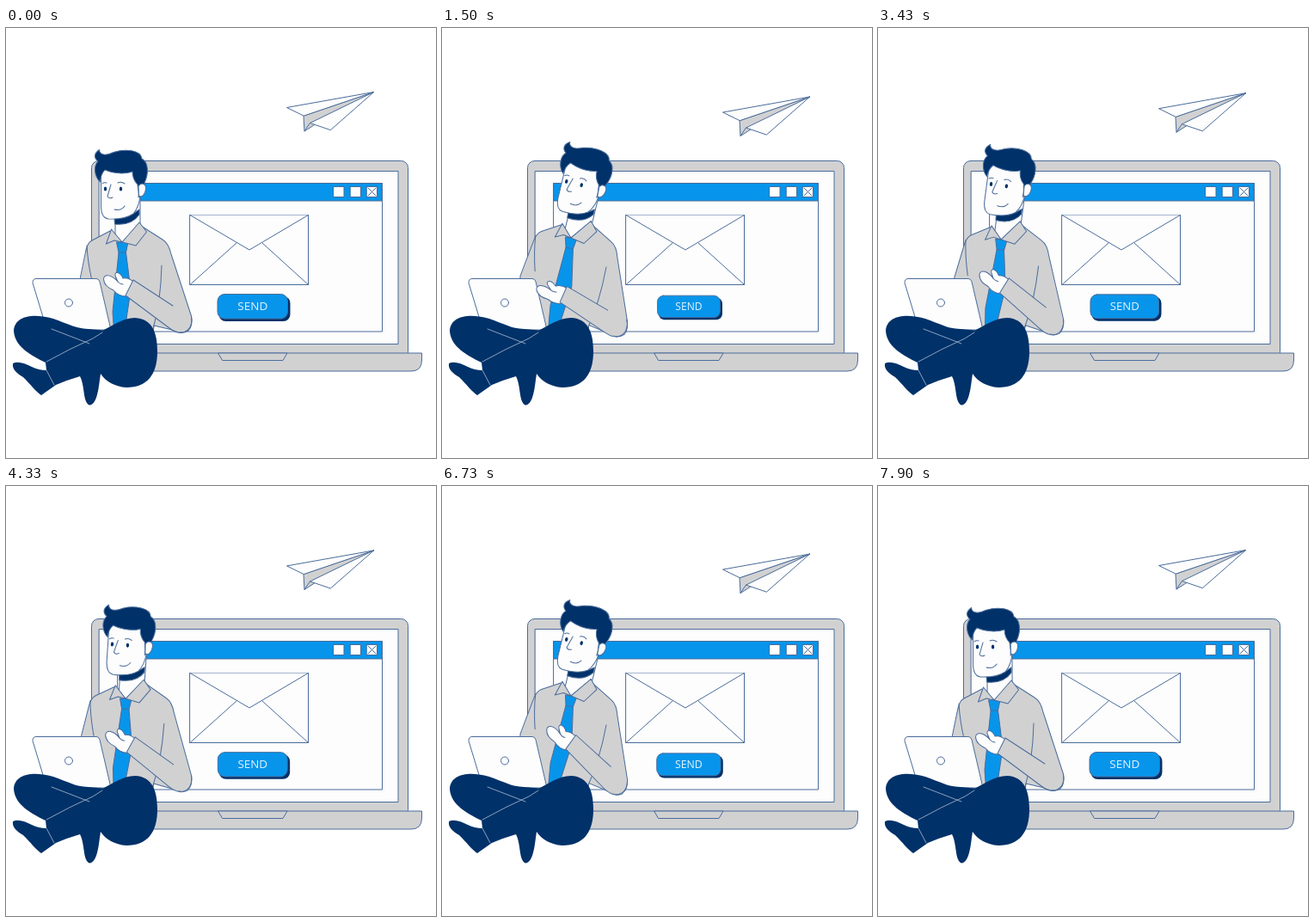
Animation of 500x500 px, one loop 8010 ms. Source, as an HTML page:

```html
<!DOCTYPE html>
<html lang="en">
<head>
<meta charset="utf-8">
<title>Send mail</title>
<style>
html, body { margin: 0; width: 100%; height: 100%; overflow: hidden; background: #fff; }
svg { display: block; width: 100vw; height: 100vh; }
.line { stroke: #4a6c9b; stroke-width: 1; stroke-linejoin: round; stroke-linecap: round; fill: none; }
.grey { fill: #d1d1d2; }
.white { fill: #fdfdfd; }
.blue { fill: #0795eb; }
.navy { fill: #003169; }
text { font: 13.5px "Open Sans", Arial, sans-serif; fill: #e6f4fd; text-anchor: middle; }
</style>
</head>
<body>
<svg viewBox="0 0 500 500">
  <!-- big laptop -->
  <rect class="line grey" x="99.5" y="154.5" width="368" height="230" rx="8"/>
  <rect class="line white" x="108.5" y="166.5" width="347.5" height="201"/>
  <path class="line grey" d="M110 378H483.500V386Q483.500 399 471 399H110Z"/>
  <path class="line grey" d="M247 378H327L322 386.500H252Z"/>
  <rect class="line white" x="130" y="180.500" width="307.500" height="172.500"/>
  <rect class="line blue" x="130" y="180.500" width="307.500" height="20.500"/>
  <g class="line white">
    <rect x="381" y="184.500" width="12" height="12"/>
    <rect x="400.500" y="184.500" width="12" height="12"/>
    <rect x="419.500" y="184.500" width="12" height="12"/>
    <path d="M421 186L430 195M430 186L421 195"/>
  </g>

  <g class="line white">
    <rect x="214" y="217.500" width="137.500" height="81"/>
    <path d="M214 298.500L268 250M351.500 298.500L298 250"/>
    <path d="M214 217.500L283 258L351.500 217.500"/>
  </g>

  <g id="button">
    <rect class="navy" x="247.500" y="312" width="83" height="29" rx="8"/>
    <rect class="line blue" x="246" y="309.500" width="81.500" height="28.500" rx="8"/>
    <text x="286.800" y="328.500">SEND</text>
  </g>

  <g id="plane" class="line white">
    <path class="grey" d="M427.500 74.500L346 102L347 120L358 113Z"/>
    <path d="M427.500 74.500L326.500 92.500L346 102Z"/>
    <path d="M427.500 74.500L353.500 110.500L377 118.500Z"/>
    <path d="M347 120L353.500 110.500"/>
  </g>

  <g id="body">
    <g id="head" class="line white">
      <path d="M127 216V250H156V190Z"/>
      <path class="navy" d="M126 221Q143 221 155 211V217Q146 230 126.500 228Z"/>
      <path d="M110.500 170L110.500 208Q111 221 119 222Q138 223 148 216Q155 208 156 194L156 164H112Z"/>
      <path class="navy" d="M109.500 179C103 173 101 161 107 155C102 151 102 146 108.500 141.500C109 149 118 148 125 144.500C139 140 157 142 158 152C166 156 166 170 161 180L160 186L154 197C155 190 153 185 153 182C149 178 147 173 147 167C135 171 122 168 115 165Q110 170 109.500 179Z"/>
      <path d="M154 184C157 179 163 181 162.500 187C162 193 158 198 154.500 195Z"/>
      <g class="navy" stroke="none">
        <ellipse cx="115.500" cy="187" rx="1.700" ry="2.500"/>
        <ellipse cx="133.500" cy="187" rx="1.700" ry="2.500"/>
      </g>
      <path fill="none" d="M112 181Q114 179 117 180M130 180Q134 178 138 181M122 182L118 196Q120 199 124 197M126 211Q134 213 138 207"/>
    </g>

    <path class="line grey" d="M121 236L100 247Q94 250 92 263L84 302L90 366H170L172 346L206 354Q218 350 215.500 335L192 263Q189 250 182 246L157 230L135 249Z"/>
    <path class="line" d="M94 253Q95 272 100 294M181 276Q180 318 171 350"/>
    <path class="line blue" d="M128.500 249H142L139.500 261L145 305L137 358H126L124 330L131 261Z"/>
    <path class="line" d="M131 261H139.500"/>
    <path class="line grey" d="M122.500 234L116.500 251L126 247L135 249ZM155 226L163.500 237L151 253L135 249Z"/>
  </g>

  <path class="line white" d="M31 296Q31 291.500 35 291.500H105Q108 291.500 109 295L122 351H48Z"/>
  <circle class="line" cx="73" cy="319.500" r="4.500"/>

  <g id="arm">
    <g id="hand" class="line white">
      <path d="M149 296Q143 290 136 291C133 284 126 282 127 288L130 295C123 287 114 285 113.500 292C114 299 119 302 125 305Q131 312 140 312Z"/>
      <path d="M130 295Q133 298 136 298"/>
    </g>
    <path class="grey" d="M194 323L148 293L139 311L190 349Q205 358 213 348L212 336Z"/>
    <path class="line" d="M194 323L148 293L139 311L190 349Q202 358 212 352Q217.500 346 215.500 335"/>
  </g>

  <!-- crossed legs -->
  <path class="navy" d="M9 352C10 336 28 333 43 335.500C60 337 72 347 90 349.500L113 351.500C124 346 136 337 150 337C171 338 176 356 176 376C176 403 164 418 140 418C126 417 116 411 110 402C108 414 107 438 97 438.500C89 435 92 416 86 405Q72 409 58 415L41 427C36 424 28 414 20 406C12 401 7 397 8 390C14 387 22 390 30 394Q38 398 47 398L46 389C30 381 10 371 9 352Z"/>
  <path class="line" style="stroke:#8ba2be" d="M53 350L97 367M47 388Q74 373 101 361L112 354M47 398L56 415"/>
</svg>
<script>
const LOOP = 8010, CYCLE = 4000, LAST = 7900;
const set = (id, value) => document.getElementById(id).setAttribute('transform', value);
const ease = x => (1 - Math.cos(Math.PI * Math.min(1, Math.max(0, x)))) / 2;
// Rises from a to b, falls back from c to d
const swing = (t, a, b, c, d) => ease((t - a) / (b - a)) - ease((t - c) / (d - c));

function draw(now) {
  const t = Math.min(now % LOOP, LAST) % CYCLE;
  const float = (1 - Math.cos(2 * Math.PI * t / CYCLE)) / 2;
  const lean = swing(t, 0, 930, 3000, 3930);
  const drop = swing(t, 930, 1500, 1900, 2500);
  const tilt = `translate(0 ${2 * lean}) rotate(${9.2 * lean} 186 338)`;

  set('plane', `translate(0 ${6.5 * float})`);
  set('button', `translate(288 325) scale(${1 - .125 * float}) translate(-288 -325)`);
  set('body', tilt);
  set('head', `rotate(${4.5 * lean} 142 236)`);
  set('arm', `${tilt} rotate(${-12 * drop} 203 340)`);
  set('hand', `rotate(${-6 * drop} 144 303)`);
}

const start = performance.now();
(function tick() {
  draw(performance.now() - start);
  requestAnimationFrame(tick);
})();
</script>
</body>
</html>
```
